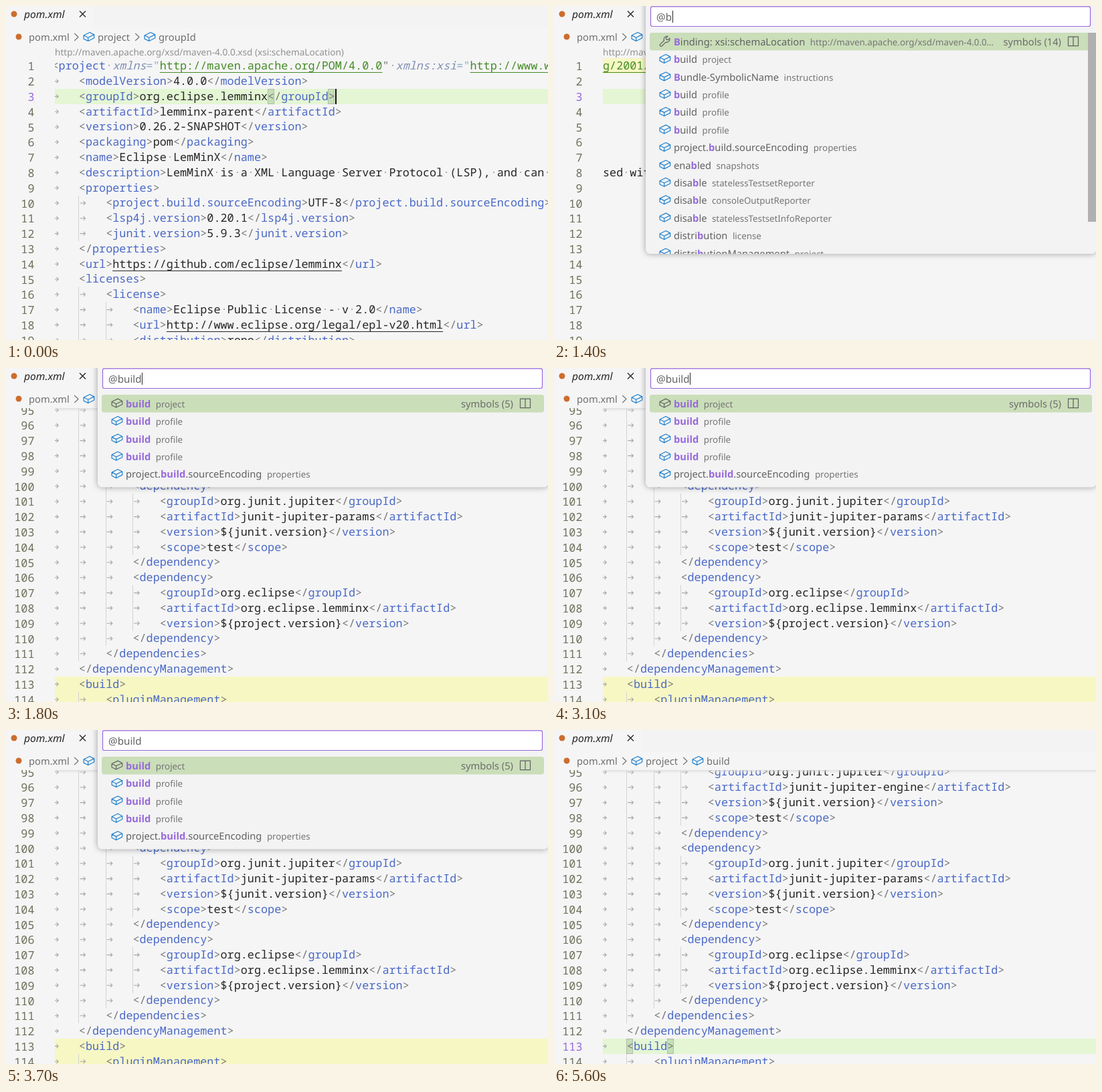
Write an HTML page with a canvas that moves like this. It is 810x500 px and loops after 5900 ms.

```html
<!DOCTYPE html>
<html lang="en">
<head>
<meta charset="utf-8">
<title>Go to symbol in an XML editor</title>
<style>
html, body { margin: 0; width: 100%; height: 100%; overflow: hidden; background: #f5f5f5; }
canvas { display: block; width: 810px; height: 500px; }
</style>
</head>
<body>
<canvas id="stage" width="810" height="500"></canvas>
<script>
const ctx = document.getElementById('stage').getContext('2d');
const LOOP = 5900, LEFT = 73, COL = 10.08, LINE = 22.8, ROW = 26.4;
const MONO = '16.8px "Noto Sans Mono", monospace';
const ui = (size, style = '') => `${style} ${size}px "Noto Sans", sans-serif`;
const C = {
  bg: '#f5f5f5', text: '#262626', tag: '#4b69c6', punct: '#777777', attr: '#8190b5',
  string: '#448c27', number: '#6d705b', accent: '#9769dc', ui: '#616161', dim: '#757575',
  mark: '#acacac', guide: '#d3d3d3', current: '#e4f6d4', range: 'rgba(253,255,0,.2)',
  pick: '#cadeb9', icon: '#1f80ce', orange: '#cc6d2e'
};

// Each line starts with its indent depth.
const parse = s => s.trim().split('\n').map(l => ({ depth: +l[0], text: l.slice(1) }));
const head = parse(`
0<project xmlns="http://maven.apache.org/POM/4.0.0" xmlns:xsi="http://www.w3.org/2001/XMLSchema-instance"
1<modelVersion>4.0.0</modelVersion>
1<groupId>org.eclipse.lemminx</groupId>
1<artifactId>lemminx-parent</artifactId>
1<version>0.26.2-SNAPSHOT</version>
1<packaging>pom</packaging>
1<name>Eclipse LemMinX</name>
1<description>LemMinX is a XML Language Server Protocol (LSP), and can be used with any editor
1<properties>
2<project.build.sourceEncoding>UTF-8</project.build.sourceEncoding>
2<lsp4j.version>0.20.1</lsp4j.version>
2<junit.version>5.9.3</junit.version>
1</properties>
1<url>https://github.com/eclipse/lemminx</url>
1<licenses>
2<license>
3<name>Eclipse Public License - v 2.0</name>
3<url>http://www.eclipse.org/legal/epl-v20.html</url>
3<distribution>repo</distribution>`);
const build = parse(`
4<groupId>org.junit.jupiter</groupId>
4<artifactId>junit-jupiter-engine</artifactId>
4<version>\${junit.version}</version>
4<scope>test</scope>
3</dependency>
3<dependency>
4<groupId>org.junit.jupiter</groupId>
4<artifactId>junit-jupiter-params</artifactId>
4<version>\${junit.version}</version>
4<scope>test</scope>
3</dependency>
3<dependency>
4<groupId>org.eclipse</groupId>
4<artifactId>org.eclipse.lemminx</artifactId>
4<version>\${project.version}</version>
3</dependency>
2</dependencies>
1</dependencyManagement>
1<build>
2<pluginManagement>`);
const profile = parse(`
5<executions>
6<execution>
7<goals>
8<goal>jar</goal>
7</goals>
6</execution>
5</executions>
4</plugin>
3</plugins>
2</pluginManagement>
1</build>
1<profiles>
2<profile>
3<id>generate-p2</id>
3<activation>
4<activeByDefault>false</activeByDefault>
4<jdk>11</jdk>
3</activation>
3<build>
4<plugins>`);

const views = {
  top: { first: 1, y: 78.4, x: 68.5, lines: head, lens: true },
  side: { first: 1, y: 78.4, x: -713.2, lines: head, lens: true },
  build: { first: 95, y: 51.6, x: 68.5, lines: build },
  profile: { first: 262, y: 51.6, x: 68.5, lines: profile }
};
const brackets = { 3: [32, 41], 113: [4, 10] };

// icon, label, description
const xsd = 'http://maven.apache.org/xsd/maven-4.0.0';
const cube = s => s.trim().split(',').map(r => ['cube', ...r.trim().split(' ')]);
const allSymbols = [
  ['cube', 'project'], ['braces', 'Grammars'], ['file', xsd + '.xsd', 'Grammars'],
  ['wrench', 'Cache', xsd + '.xsd'],
  ['file', 'file:///home/pvorlund/.lemminx/cache/http/maven.apache.org/xsd/maven-4.0.0.xsd…'],
  ['wrench', 'Binding: xsi:schemaLocation', xsd + '.xsd'],
  ...cube('modelVersion project, groupId project, artifactId project, version project, packaging project, name project, description project')
];
const lists = {
  all: { items: allSymbols, count: 243, thumb: 24 },
  b: {
    items: [['wrench', 'Binding: xsi:schemaLocation', xsd + '…'],
      ...cube(`build project, Bundle-SymbolicName instructions, build profile, build profile, build profile,
        project.build.sourceEncoding properties, enabled snapshots, disable statelessTestsetReporter,
        disable consoleOutputReporter, disable statelessTestsetInfoReporter, distribution license,
        distributionManagement project`)],
    count: 14, thumb: 283
  },
  bu: {
    items: cube(`build project, Bundle-SymbolicName instructions, build profile, build profile, build profile,
      project.build.sourceEncoding properties, distribution license, distributionManagement project`),
    count: 8
  },
  build: {
    items: cube('build project, build profile, build profile, build profile, project.build.sourceEncoding properties'),
    count: 5
  }
};

// Each step changes only the listed values.
const steps = [
  [0, { view: 'top', active: 3, caret: true, crumb: 'groupId' }],
  [400, { caret: false }],
  [700, { caret: true, list: 'all', match: '', query: '@', sel: 7, range: [3, 3], bar: '#e8e8e8' }],
  [800, { bar: '#b0b0b0' }],
  [1300, { query: '@b' }],
  [1400, { view: 'side', list: 'b', match: 'b', sel: 0, range: [1, 1] }],
  [1500, { view: 'build', list: 'bu', query: '@bu', match: 'bu', range: [113, 114] }],
  [1600, { list: 'build', query: '@bui', match: 'bui' }],
  [1700, { query: '@buil', match: 'buil' }],
  [1800, { query: '@build', match: 'build' }],
  [2400, { caret: false }],
  [3100, { caret: true }],
  [3400, { view: 'profile', sel: 1, range: [280, 281] }],
  [3600, { caret: false }],
  [3700, { view: 'build', sel: 0, range: [113, 114] }],
  [4100, { list: null, range: null, active: 113 }],
  [4200, { caret: true }],
  [4300, { crumb: 'build' }],
  [4700, { caret: false }],
  [5100, { caret: true }],
  [5600, { caret: false }]
];

function box(x, y, w, h, color) {
  ctx.fillStyle = color;
  ctx.fillRect(x, y, w, h);
}
function label(s, x, y, font, color, align = 'left') {
  ctx.font = font;
  ctx.fillStyle = color;
  ctx.textAlign = align;
  ctx.fillText(s, x, Math.round(y));
  return x + ctx.measureText(s).width;
}
function stroke(d, x, y, scale, color, width = 1.2) {
  ctx.save();
  ctx.translate(x, y);
  ctx.scale(scale, scale);
  ctx.strokeStyle = color;
  ctx.lineWidth = width / scale;
  ctx.lineJoin = 'round';
  ctx.stroke(new Path2D(d));
  ctx.restore();
}
const icons = {
  cube: 'M1.5 6.3L9 2.6L14.5 5.4V9.6L7 13.4L1.5 10.6ZM1.5 6.3L7 9L14.5 5.4M7 9V13.4',
  braces: 'M5.5 2.5Q3.7 2.5 3.7 4.3V6Q3.7 7.8 2 8Q3.7 8.2 3.7 10V11.7Q3.7 13.5 5.5 13.5M10.5 2.5Q12.3 2.5 12.3 4.3V6Q12.3 7.8 14 8Q12.3 8.2 12.3 10V11.7Q12.3 13.5 10.5 13.5',
  file: 'M2.5 1.5H9.5L13.5 5.5V14.5H2.5ZM9.5 1.5V5.5H13.5',
  wrench: 'M13.8 4.3L11.6 6.4L9.6 6L9.2 4.2L11.4 2A4 4 0 0 0 6.8 7.3L1.9 12A1.6 1.6 0 0 0 4.1 14.2L9 9.3A4 4 0 0 0 13.8 4.3Z'
};
const icon = (name, x, cy, color) => stroke(icons[name], x, cy - 9.6, 1.2, color);

function tokens(text) {
  let inTag = false;
  return text.match(/<\/?|>|[^<>]+/g).flatMap(part => {
    if (/^[<>]/.test(part)) {
      inTag = part !== '>';
      return [[part, C.punct]];
    }
    if (!inTag) return [[part, C.text]];
    const [name, ...attrs] = part.match(/^[\w.]+|\s|[\w:]+(?==)|="|"|[^\s"]+/g);
    return [[name, C.tag], ...attrs.map(a =>
      a === '="' ? [a, '#91a9c8'] : a.startsWith('http') ? [a, C.string] :
      a === '"' ? [a, C.punct] : [a, C.attr, 'italic '])];
  });
}
function drawCode(text, x, baseline) {
  for (const [part, color, style = ''] of tokens(text)) {
    const start = x;
    ctx.font = style + MONO;
    ctx.textAlign = 'left';
    for (const ch of part) {
      if (x > -20 && x < 810) {
        if (ch === ' ') box(Math.round(x + 4), baseline - 7, 2, 2, C.mark);
        else {
          ctx.fillStyle = color;
          ctx.fillText(ch, x, baseline);
        }
      }
      x += COL;
    }
    if (part.startsWith('http')) box(start, baseline + 4, x - start, 1, color);
  }
}

function drawEditor(s) {
  const v = views[s.view];
  const top = n => v.y + (n - v.first) * LINE;
  ctx.save();
  ctx.beginPath();
  ctx.rect(0, 60, 810, 440);
  ctx.clip();
  v.lines.forEach((_, i) => {
    const n = v.first + i;
    label(n, 42.5, top(n) + 18, MONO, n === s.active ? C.accent : C.number, 'right');
  });
  ctx.beginPath();
  ctx.rect(LEFT, 60, 810, 440);
  ctx.clip();
  v.lines.forEach(({ depth, text }, i) => {
    const n = v.first + i, y = top(n), edge = Math.round(y);
    const h = Math.round(y + LINE) - edge;
    if (n === s.active) box(LEFT, edge, 810, h, C.current);
    if (s.range && n >= s.range[0] && n <= s.range[1]) box(LEFT, edge, 810, h, C.range);
    for (let d = 0; d < depth; d++) {
      const x = v.x + d * 4 * COL;
      if (d) box(Math.round(x - .5), edge, 1, h, C.guide);
      stroke('M1 0H9M6.3 -2.8L9.2 0L6.3 2.8', x + .6, y + 11.4, 1, '#a8a8a8', 1.1);
    }
    if (n === s.active && !s.list) for (const c of brackets[n]) {
      const x = Math.round(v.x + c * COL - .5);
      box(x, edge, 10, h, 'rgba(0,100,0,.14)');
      ctx.strokeStyle = '#b4b8b0';
      ctx.lineWidth = 1;
      ctx.strokeRect(x + .5, edge + .5, 9, h - 1);
    }
    drawCode(text, v.x + depth * 4 * COL, Math.round(y + 16.7));
  });
  if (v.lens) label(xsd + '.xsd (xsi:schemaLocation)', LEFT, 74, ui(13.6), '#919191');
  if (s.caret && !s.list) {
    const col = s.active === 3 ? 42 : 4;
    box(Math.round(v.x + col * COL), Math.round(top(s.active)), 2, 23, '#111');
  }
  if (!v.lens) {
    const fade = ctx.createLinearGradient(0, 59, 0, 65);
    fade.addColorStop(0, 'rgba(214,214,214,.9)');
    fade.addColorStop(1, 'rgba(221,221,221,0)');
    box(0, 59, 810, 6, fade);
  }
  ctx.restore();
}

function dot(x, y) {
  ctx.fillStyle = C.orange;
  ctx.beginPath();
  ctx.arc(x, y, 4.5, 0, 7);
  ctx.fill();
}
function drawHeader(s) {
  box(131, 0, 679, 33, '#f3f3f3');
  dot(12, 12);
  label('pom.xml', 27, 18, ui(15.6, 'italic'), C.text);
  stroke('M-4.5 -4.5L4.5 4.5M4.5 -4.5L-4.5 4.5', 114.5, 12, 1, C.text, 1.3);
  dot(19, 46);
  let name = 'pom.xml', x = 34;
  for (const next of ['project', s.crumb, null]) {
    label(name, x, 52, ui(14.7), '#6f6f6f');
    if (!next) break;
    const at = next === 'project' ? 0 : 91;
    stroke('M-2.8 -5.5L3 0L-2.8 5.5', 105 + at, 46.5, 1, C.dim);
    icon('cube', 114.3 + at, 46, C.icon);
    name = next;
    x = 137 + at;
  }
}

function drawRow([kind, name, info], i, s, count) {
  const cy = 40 + ROW * (i + .5), base = cy + 5.6, picked = i === s.sel;
  if (picked) {
    ctx.fillStyle = C.pick;
    ctx.beginPath();
    ctx.roundRect(143, cy - 13.2, 661, ROW, 3.6);
    ctx.fill();
    stroke('M.5 .5H15.5V14H.5ZM8 .5V14', 768, cy - 7.5, 1, C.ui);
  }
  icon(kind, 156.3, cy - .6, picked || kind !== 'cube' ? C.ui : C.icon);
  const at = s.match ? name.toLowerCase().indexOf(s.match) : 0, end = at + s.match.length;
  let x = 179;
  x = label(name.slice(0, at), x, base, ui(14.7), C.ui);
  x = label(name.slice(at, end), x, base, ui(14.7, 'bold'), C.accent);
  x = label(name.slice(end), x, base, ui(14.7), C.ui);
  if (info) label(info, x + 7.5, base, ui(13.3), C.dim);
  if (i === 0) {
    label(`symbols (${count})`, picked ? 758 : 787, base, ui(14.7), picked ? '#6c6c6c' : '#a8a8a8', 'right');
  }
}
function drawPanel(s) {
  const { items, count, thumb } = lists[s.list];
  const bottom = items.length > 12 ? 371 : 46.6 + items.length * ROW;
  ctx.save();
  ctx.shadowColor = 'rgba(0,0,0,.36)';
  ctx.shadowBlur = 10;
  ctx.fillStyle = '#f3f3f3';
  ctx.beginPath();
  ctx.roundRect(137, -30, 673.5, bottom + 30, 7);
  ctx.fill();
  ctx.shadowColor = 'transparent';
  ctx.clip();
  items.forEach((item, i) => drawRow(item, i, s, count));
  if (thumb) box(798, 40, 12, thumb, s.bar);
  ctx.restore();

  ctx.fillStyle = '#fff';
  ctx.strokeStyle = C.accent;
  ctx.lineWidth = 1.2;
  ctx.beginPath();
  ctx.roundRect(144.5, .8, 657, 29.7, 2.4);
  ctx.fill();
  ctx.stroke();
  const x = label(s.query, 153, 22, ui(15.2), C.ui);
  if (s.caret) box(Math.round(x + .6), 7, 1, 18, C.text);
}

function draw(time) {
  const t = time % LOOP;
  const state = Object.assign({}, ...steps.filter(([at]) => at <= t).map(([, change]) => change));
  ctx.textRendering = 'geometricPrecision';
  box(0, 0, 810, 500, C.bg);
  drawEditor(state);
  drawHeader(state);
  if (state.list) drawPanel(state);
}

const start = performance.now();
function tick() {
  draw(performance.now() - start);
  requestAnimationFrame(tick);
}
tick();
</script>
</body>
</html>
```
